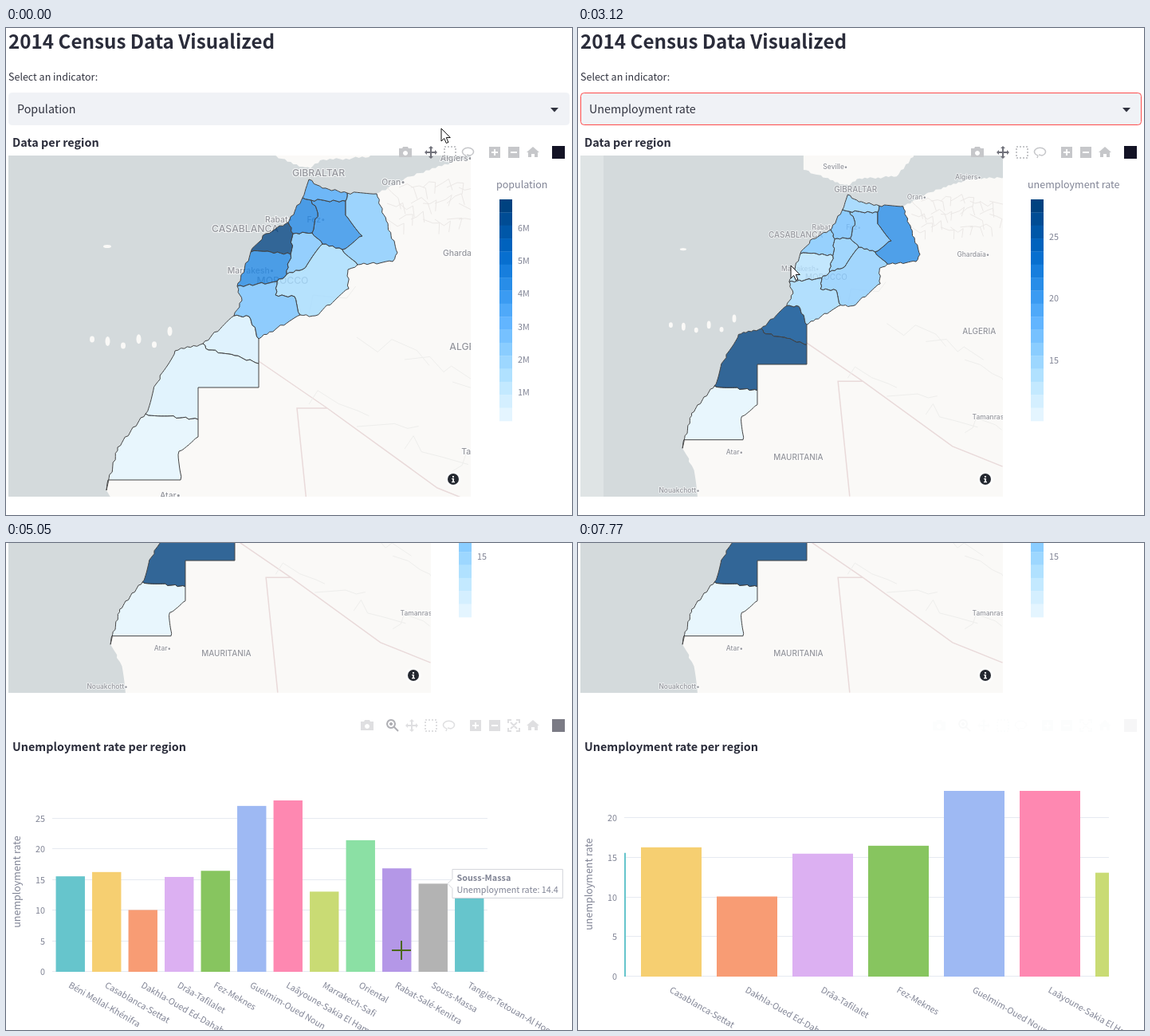
Recreate the animation shown at these times as an HTML page. Size 710 by 611 pixels, loop 8000 ms.

```html
<!DOCTYPE html>
<html lang="en">
<head>
<meta charset="utf-8">
<title>Census dashboard</title>
<style>
  html, body { margin: 0; width: 100%; height: 100%; overflow: hidden; background: #fff; }
  svg { display: block; width: 710px; height: 611px; }
  text { font-family: "Noto Sans CJK JP", "Noto Sans CJK SC", "Noto Sans", sans-serif; white-space: pre; }
  .place { font-family: Inter, "Open Sans", sans-serif; text-anchor: middle; paint-order: stroke; stroke: #fff; stroke-opacity: .7; stroke-width: 2px; }
  .region { stroke: #444; stroke-width: 1px; fill-opacity: .8; vector-effect: non-scaling-stroke; }
  #panel { filter: drop-shadow(0 4px 8px rgba(0, 0, 0, .3)); }
  #cross { mix-blend-mode: difference; }
  #click { mix-blend-mode: multiply; }
</style>
</head>
<body>
<svg id="stage" viewBox="0 0 710 611"></svg>
<script>
const LOOP = 8000;
const NS = 'http://www.w3.org/2000/svg';
const stage = document.getElementById('stage');

function set(node, attrs) {
  for (const key in attrs) node.setAttribute(key, attrs[key]);
  return node;
}
function add(parent, tag, attrs = {}, content) {
  const node = set(document.createElementNS(NS, tag), attrs);
  if (content !== undefined) node.textContent = content;
  parent.appendChild(node);
  return node;
}
const show = (node, on) => { node.style.display = on ? '' : 'none'; };
const fade = (node, opacity) => { show(node, opacity > 0); node.style.opacity = opacity; };
const ramp = (t, from, to) => Math.min(1, Math.max(0, (t - from) / (to - from)));
const smooth = k => k * k * (3 - 2 * k);
const mix = (a, b, k) => a + (b - a) * k;
const between = (t, from, to) => t >= from && t < to;
function noise(n) {
  const s = Math.sin(n) * 43758.5453;
  return s - Math.floor(s) - .5;
}

const INK = '#31333f', GREY = '#808495';
const SIZE = { big: 24.2, title: 14.4, body: 14.3, small: 12.5, tick: 10.8 };
function label(parent, x, y, content, size, fill = INK, extra = {}) {
  return add(parent, 'text', { x, y, 'font-size': size, fill, ...extra }, content);
}
const heading = (parent, x, y, content, size) => label(parent, x, y, content, size, '#2a2c3a', { 'font-weight': 700 });
function clip(id, x, y, width, height) {
  return add(add(stage, 'clipPath', { id }), 'rect', { x, y, width, height });
}

// Name, population in millions, unemployment rate, bar colour, border nodes
const REGIONS = [
  ['Béni Mellal-Khénifra', 2.52, 15.6, '#66c5cc', 'FELQJG'],
  ['Casablanca-Settat', 6.86, 16.3, '#f6cf71', 'nFGIlm'],
  ['Dakhla-Oued Ed-Dahab', .14, 10.1, '#f89c74', 'd45678ab'],
  ['Drâa-Tafilalet', 1.63, 15.5, '#dcb0f2', 'LMyRSUVWXKJQ'],
  ['Fez-Meknes', 4.24, 16.5, '#87c55f', 'ACONMLED'],
  ['Guelmim-Oued Noun', .43, 27.1, '#9eb9f3', 'iZY190h'],
  ['Laâyoune-Sakia El Hamra', .37, 28, '#fe88b1', 'h091234def'],
  ['Marrakech-Safi', 4.52, 13.1, '#c9db74', 'lIGJKk'],
  ['Oriental', 2.31, 21.5, '#8be0a4', 'stvwxyMNOC'],
  ['Rabat-Salé-Kenitra', 4.58, 16.9, '#b497e7', 'npADEF'],
  ['Souss-Massa', 2.68, 14.4, '#b3b3b3', 'kKXWVYZij'],
  ['Tangier-Tetouan-Al Hoceima', 3.56, 14.9, '#66c5cc', 'pqrsCA'],
].map(([name, population, rate, color, nodes]) => ({ name, population, rate, color, nodes }));

// Border nodes shared by neighbours: coast in lower case, inland in capitals, desert in digits
const COAST = 'abdefhijklmnpqrst';
const NODES = {};
const nodeList =
  'a126,580 b140,526 d175,484 e188,447 f212,405 h247,396 i286,361 j296,342 k290,324 l307,281 m326,258 n354,244 ' +
  'p372,213 q380,190 r397,201 s428,207 t465,208 v477,242 w491,282 x485,293 y441,297 ' +
  'A383,216 C426,217 D391,232 E384,257 F360,258 G357,284 I328,280 J352,309 K340,318 L397,271 M422,278 N447,261 O426,235 ' +
  'Q372,303 R429,303 S430,327 U388,361 V369,360 W362,337 X338,335 Y317,390 Z305,362';
const desert = '0:254,404 1:317,421 2:317,451 3:241,451 4:241,491 5:241,513 6:217,531 7:219,567 8:128,567 9:287,411';
const parse = pair => pair.split(',').map(Number);
for (const item of nodeList.split(' ')) NODES[item[0]] = parse(item.slice(1));
for (const item of desert.split(' ')) NODES[item[0]] = parse(item.slice(2));
const nodesOf = letters => [...letters].map(letter => NODES[letter]);

// Wobbly outline; each wobble depends on its edge only, so neighbours share it
function rough(points) {
  const out = [];
  points.forEach((a, i) => {
    const b = points[(i + 1) % points.length];
    out.push(a);
    if (a[0] === b[0] || a[1] === b[1]) return;
    const [p, q] = a[0] < b[0] ? [a, b] : [b, a];
    const dx = q[0] - p[0], dy = q[1] - p[1], length = Math.hypot(dx, dy);
    const n = Math.max(1, Math.round(length / 4));
    for (let j = 1; j < n; j++) {
      const k = p === a ? j : n - j;
      const off = noise(p[0] * 12.9 + p[1] * 78.2 + k * 37.7) * 3 / length;
      out.push([p[0] + dx * k / n - dy * off, p[1] + dy * k / n + dx * off]);
    }
  });
  return 'M' + out.map(p => p.map(v => v.toFixed(1)).join()).join('L') + 'Z';
}

const BLUES = ['e4f5ff', 'c7ebff', 'a6dcff', '83c9ff', '60b4ff', '3d9df3', '1c83e1', '0068c9', '0054a3', '004280'];
function blue(k) {
  const at = Math.min(8.999, Math.max(0, k * 9)), i = Math.floor(at);
  const channel = (hex, c) => parseInt(hex.slice(c * 2, c * 2 + 2), 16);
  return `rgb(${[0, 1, 2].map(c => Math.round(mix(channel(BLUES[i], c), channel(BLUES[i + 1], c), at - i)))})`;
}
const peopleShare = millions => (millions - .14) / 6.72;
const rateShare = rate => (rate - 10.1) / 17.9;

// Toolbar icons, centred on the origin
const ICONS = {
  camera: 'M-8,-5h4l1,-2h6l1,2h4v11h-16zM0,-2a3,3 0 1 0 .01,0z',
  pan: 'M0,-8l3,3h-2v4h4v-2l3,3l-3,3v-2h-4v4h2l-3,3l-3,-3h2v-4h-4v2l-3,-3l3,-3v2h4v-4h-2z',
  plus: 'M-7,-7h14v14h-14zM-1,-4v3h-3v2h3v3h2v-3h3v-2h-3v-3z',
  minus: 'M-7,-7h14v14h-14zM-4,-1v2h8v-2z',
  home: 'M0,-7l8,7h-2v6h-4v-4h-4v4h-4v-6h-2z',
  square: 'M-8,-8h16v16h-16z',
};
const LINE_ICONS = {
  box: 'M-7,-7h14v14h-14z',
  lasso: 'M-4,4a7,5 0 1 1 5,0l-4,-1M-4,4l-1,3',
  zoom: 'M-2,-7a5,5 0 1 0 .01,0M2,2l5,5M-4,-2h4M-2,-4v4',
  scale: 'M-7,-3v-4h4M3,-7h4v4M7,3v4h-4M-3,7h-4v-4M-4,-4l8,8M4,-4l-8,8',
};
// Icons run leftwards from the right edge; "|" widens the gap between groups
function toolbar(parent, y, active, names) {
  const bar = add(parent, 'g');
  let x = 693;
  for (const name of names.split(' ').reverse()) {
    if (name === '|') { x -= 8; continue; }
    const tone = name === 'square' ? '#131325' : name === active ? '#70717a' : '#c6c7ca';
    const line = LINE_ICONS[name];
    add(bar, 'path', {
      d: line || ICONS[name], transform: `translate(${x} ${y})`, 'fill-rule': 'evenodd',
      fill: line ? 'none' : tone, stroke: line ? tone : 'none',
      'stroke-width': name === 'lasso' ? 1.5 : 2, 'stroke-dasharray': name === 'box' ? '2 2' : 'none',
    });
    x -= 24;
  }
  return bar;
}

// Page top
add(stage, 'rect', { width: 710, height: 611, fill: '#fff' });
const page = add(stage, 'g');
heading(page, 3, 26, '2014 Census Data Visualized', SIZE.big);
label(page, 3, 66, 'Select an indicator:', SIZE.small);
const field = add(page, 'rect', { x: 3.5, y: 81.5, width: 703, height: 40, rx: 4, fill: '#f0f2f6' });
const choice = label(page, 14, 107, '', SIZE.body);
const caret = add(page, 'rect', { x: 150, y: 92, width: 1, height: 20, fill: INK });
add(page, 'path', { d: 'M683,100h10l-5,5.5z', fill: INK });
heading(page, 8, 149, 'Data per region', SIZE.title);

// Map
const MAP = { x: 3, y: 160, width: 580, height: 428 };
const LAND = '#faf9f7';
const mapFrame = clip('map-clip', MAP.x, MAP.y, MAP.width, MAP.height);
const mapBox = add(page, 'g', { 'clip-path': 'url(#map-clip)' });
add(mapBox, 'rect', { ...MAP, fill: '#d4dadc' });
const map = add(mapBox, 'g');
const africa = [...nodesOf(COAST), [500, 189], [566, 166], [720, 160], [720, 660], [150, 660], [142, 610]];
const spain = [[312, 120], [312, 152], [372, 174], [382, 176], [394, 166], [455, 162], [490, 120]];
for (const land of [africa, spain]) add(map, 'path', { fill: LAND, d: rough(land) });
for (let i = 0; i < 6; i++)
  add(map, 'ellipse', { cx: 108 + i * 19.5, cy: 394 + noise(i + 3) * 12 - (i > 4 ? 18 : 0), rx: 3, ry: 4 + i % 2 * 2, fill: LAND });
add(map, 'ellipse', { cx: 127, cy: 274, rx: 5, ry: 2, fill: LAND });

function thinLine(d, stroke, width) {
  add(map, 'path', { d, stroke, fill: 'none', 'stroke-width': width, 'vector-effect': 'non-scaling-stroke' });
}
thinLine('M317,418L403,477L541,577L618,608M403,477H365L383,654', '#e9dada', 1.5);
let roads = '', cells = '';
for (let i = 0; i < 8; i++) {
  roads += `M${380 + i % 4 * 60},${360 + i * 28}`;
  for (let j = 0; j < 4; j++) roads += `l${20 + noise(i * 9 + j) * 30},${noise(i * 5 + j) * 50}`;
}
for (let i = 0; i < 26; i++)
  cells += `M${478 + i % 9 * 15},${200 + Math.floor(i / 9) * 20}l${10 + noise(i) * 8},${noise(i + 50) * 18}l8,${noise(i + 90) * 14}l${noise(i + 7) * 12},14`;
thinLine(roads, '#eeeeec', 1);
thinLine(cells, '#ebe8e6', 1);

const PLACES = {
  GIBRALTAR: [392, 186], CASABLANCA: [300, 256], MOROCCO: [347, 321], ALGERIA: [582, 404], MAURITANIA: [304, 597.5],
  Oran: [486, 197], Algiers: [565, 167], Rabat: [342, 244], Fez: [389, 244], Marrakesh: [307, 308],
  Ghardaïa: [573, 286], Tamanrasset: [606, 535], Atar: [206, 590], Seville: [361, 151], Nouakchott: [121, 648],
};
for (const name in PLACES) {
  const country = name === name.toUpperCase();
  label(map, ...PLACES[name], country ? name : name + '•', country ? 12.2 : 10.4, '#94969c', { class: 'place', 'font-weight': 500 });
}
for (const region of REGIONS) region.shape = add(map, 'path', { class: 'region', d: rough(nodesOf(region.nodes)) });
const strip = add(mapBox, 'rect', { ...MAP, width: 29, fill: '#fff', opacity: .25 });
const mapCover = add(mapBox, 'rect', { ...MAP, fill: '#fff' });
const info = add(page, 'g');
add(info, 'circle', { r: 10, fill: '#fff', 'fill-opacity': .6 });
add(info, 'circle', { r: 7, fill: '#242830' });
add(info, 'path', { d: 'M-1,-4h2v2h-2zM-1.8,-1h2.8v4h1v1.2h-4v-1.2h1.2v-2.8h-1z', fill: '#fff' });

// Colour scales
const SCALE = { top: 215, height: 278, steps: 17 };
function colourScale(title, x, ticks, share, unit) {
  const scale = add(page, 'g');
  label(scale, x - 4, 201, title, SIZE.small, GREY);
  const band = SCALE.height / SCALE.steps;
  for (let i = 0; i < SCALE.steps; i++)
    add(scale, 'rect', { x, y: SCALE.top + band * i, width: 16, height: band + .3, fill: blue(1 - i / (SCALE.steps - 1)) });
  for (const tick of ticks)
    label(scale, x + 23, SCALE.top + SCALE.height * (1 - share(tick)) + 4, tick + unit, SIZE.tick, GREY);
  return scale;
}
const populationScale = colourScale('population', 619, [1, 2, 3, 4, 5, 6], peopleShare, 'M');
const rateScale = colourScale('unemployment rate', 568, [15, 20, 25], rateShare, '');
const mapTools = toolbar(page, 156, 'pan', 'camera | pan box lasso | plus minus home | square');

// Bar chart
const WIDE = { left: 58, right: 604, bottom: 538, first: 80.75, step: 45.5, unit: 7.68, titleY: 425 };
const ZOOMED = { left: 58, right: 666, bottom: 544, first: 22, step: 95, unit: 9.95, titleY: 428 };
const PLOT_TOP = 311;
const chart = add(stage, 'g');
heading(chart, 8, 261, 'Unemployment rate per region', SIZE.title);
const axisTitle = label(chart, 0, 0, 'unemployment rate', SIZE.small, GREY, { 'text-anchor': 'middle' });
const chartTools = toolbar(chart, 229, 'zoom', 'camera | zoom pan box lasso | plus minus scale home | square');
const grid = [0, 5, 10, 15, 20, 25].map(value => ({
  value,
  line: add(chart, 'path', { stroke: '#e6eaf1' }),
  text: label(chart, 49, 0, value, SIZE.tick, GREY, { 'text-anchor': 'end' }),
}));
const plotFrame = clip('plot-clip', WIDE.left, PLOT_TOP, 0, 0);
const bars = add(chart, 'g', { 'clip-path': 'url(#plot-clip)' });
for (const region of REGIONS) {
  region.bar = add(bars, 'rect', { fill: region.color });
  region.text = label(chart, 0, 0, region.name, SIZE.tick, GREY);
}
const shade = add(chart, 'path', { 'fill-opacity': .4, 'fill-rule': 'evenodd' });
const corners = add(chart, 'path', { fill: '#fff', stroke: '#444' });
const tip = add(chart, 'g');
const tipBox = add(tip, 'path', { fill: '#fff', stroke: '#d3d5da' });
const tipName = label(tip, 0, 0, '', SIZE.tick, GREY, { 'font-weight': 700 });
const tipValue = label(tip, 0, 0, '', SIZE.tick, GREY);

function drawChart({ left, right, bottom, first, step, unit, titleY }) {
  set(plotFrame, { width: right - left, height: bottom - PLOT_TOP });
  set(axisTitle, { transform: `translate(18 ${titleY}) rotate(-90)` });
  for (const { value, line, text } of grid) {
    const y = bottom - value * unit;
    show(line, y > PLOT_TOP);
    show(text, y > PLOT_TOP);
    set(line, { d: `M${left},${Math.round(y) - .5}H${right}` });
    set(text, { y: y + 4 });
  }
  REGIONS.forEach((region, i) => {
    const centre = first + step * i, height = region.rate * unit;
    set(region.bar, { x: centre - step * .4, y: bottom - height, width: step * .8, height });
    show(region.text, centre > left && centre < right);
    set(region.text, { transform: `translate(${centre - 3} ${bottom + 19}) rotate(30)` });
  });
}

function drawTip(x, y) {
  const i = Math.floor((x - WIDE.left) / WIDE.step), region = REGIONS[i];
  const on = Boolean(region) && y > PLOT_TOP && y < WIDE.bottom;
  show(tip, on);
  if (!on) return;
  tipName.textContent = region.name;
  tipValue.textContent = 'Unemployment rate: ' + region.rate;
  const width = Math.max(tipName.getComputedTextLength(), tipValue.getComputedTextLength()) + 11;
  const centre = WIDE.first + WIDE.step * i, half = WIDE.step * .4;
  const side = centre + half + 6 + width < 706 ? 1 : -1;
  const tipX = centre + side * half, tipY = WIDE.bottom - region.rate * WIDE.unit;
  const near = tipX + side * 6, textX = (side > 0 ? near : near - width) + 5.5;
  set(tipBox, { d: `M${tipX},${tipY}L${near},${tipY - 6}v-12h${side * width}v36h${-side * width}v-12Z` });
  set(tipName, { x: textX, y: tipY - 3 });
  set(tipValue, { x: textX, y: tipY + 12 });
}

const DRAG = { x: 98, y: 358 };
function drawSelection(x, y) {
  const { left, right, bottom } = WIDE;
  const r = Math.max(DRAG.x + 1, x), b = Math.min(bottom, Math.max(DRAG.y + 1, y));
  set(shade, { d: `M${left},${PLOT_TOP}H${right}V${bottom}H${left}ZM${DRAG.x},${DRAG.y}H${r}V${b}H${DRAG.x}Z` });
  const arm = Math.min(10, (r - DRAG.x) / 2, (b - DRAG.y) / 2);
  const corner = (cx, cy, sx, sy) =>
    `M${cx - sx * 3.5},${cy + sy * (arm - .5)}h${sx * 3}v${-sy * arm}h${sx * arm}v${-sy * 3}h${-sx * (arm + 3)}Z`;
  set(corners, { d: corner(DRAG.x, DRAG.y, 1, 1) + corner(r, DRAG.y, -1, 1) + corner(DRAG.x, b, 1, -1) + corner(r, b, -1, -1) });
}

// Dropdown
const ROW = 40, LIST_TOP = 122;
const panel = add(stage, 'g', { id: 'panel' });
clip('panel-clip', 3, LIST_TOP, 704, 300);
add(panel, 'rect', { x: 3, y: LIST_TOP, width: 704, height: 300, rx: 3, fill: '#fff' });
const list = add(panel, 'g', { 'clip-path': 'url(#panel-clip)' });
const hoverRow = add(list, 'rect', { x: 3, width: 698, height: ROW, fill: '#f0f2f6' });
['Population', 'Density', 'Multidimensional poverty index (in %)', 'Illiteracy rate', 'Unemployment rate', 'Fertility rate', 'Number of households', 'Proportion of singles']
  .forEach((option, i) => label(list, 19, LIST_TOP + 25 + i * ROW, option, SIZE.body));
add(list, 'rect', { x: 701, y: LIST_TOP, width: 6, height: 225, rx: 3, fill: '#a9a9ab' });

// Pointer
const click = add(stage, 'circle', { id: 'click', r: 12, fill: '#ffff66' });
const pointerStyle = { fill: '#fff', stroke: '#111', 'stroke-linejoin': 'round' };
const pointers = {
  arrow: add(stage, 'path', { ...pointerStyle, d: 'M0,0v16l3.7,-3.5l2.6,6l2.6,-1.1l-2.6,-5.9h5z' }),
  hand: add(stage, 'path', { ...pointerStyle, d: 'M-1.5,1.5a1.5,1.5 0 0 1 3,0v6l7,1.5q2,.6 2,3l-.5,5q-1,2 -1,5h-9l-6,-8q-1,-2 1,-2.5l3.5,2.5z' }),
  cross: add(stage, 'path', { id: 'cross', d: 'M-12,0h24M0,-12v24', stroke: '#fff', 'stroke-width': 2 }),
};
const SWITCH = 2080, PRESS = 5820, RELEASE = 7100, LAG = 70;
// Pointer moves: start, end, target x, target y; it rests in between
const MOVES = [
  [70, 210, 541, 102], [960, 1720, 267, 298], [3330, 4300, 580, 513], [4920, 5050, 497, 511],
  [5050, 5750, DRAG.x, DRAG.y], [PRESS, 6580, 304, 537], [6580, 6900, 390, 547], [7480, 7700, 86, 452],
];
function pointerAt(t) {
  return MOVES.reduce(([x, y], [from, to, toX, toY]) => {
    const k = ramp(t, from, to);
    return [mix(x, toX, k), mix(y, toY, k)];
  }, [546, 126]);
}

function drawMap(t, rateView) {
  const width = rateView ? 530 : MAP.width;
  set(mapFrame, { width });
  set(map, { transform: rateView ? 'translate(28.3 54) scale(.816)' : '' });
  for (const { shape, population, rate } of REGIONS)
    set(shape, { fill: blue(rateView ? rateShare(rate) : peopleShare(population)) });
  fade(mapCover, rateView ? 1 - ramp(t, 2740, 3090) : 0);
  show(strip, rateView && t < 4160);
  set(info, { transform: `translate(${width - 19} 566)` });
  show(populationScale, !rateView);
  show(rateScale, rateView);
}

function render(t) {
  const rateView = t >= SWITCH, zoomed = t >= RELEASE;
  const scroll = 400 * smooth(ramp(t, 4480, 4850));
  const [x, y] = pointerAt(t), [lagX, lagY] = pointerAt(t - LAG);
  set(page, { transform: `translate(0 ${-scroll})` });
  set(chart, { transform: `translate(0 ${400 - scroll})` });

  choice.textContent = rateView ? 'Unemployment rate' : 'Population';
  set(field, { stroke: t >= 350 ? '#ff4b4b' : '#f0f2f6' });
  show(caret, t >= 2370 && (t - 2370) % 1000 < 500);
  drawMap(t, rateView);
  fade(mapTools, rateView ? 1 : 1 - ramp(t, 50, 210));

  fade(panel, ramp(t, 380, 540) * (1 - ramp(t, 2030, SWITCH)));
  set(hoverRow, { y: LIST_TOP + ROW * Math.max(0, Math.floor((y - LIST_TOP) / ROW)) });

  drawChart(zoomed ? ZOOMED : WIDE);
  fade(chartTools, zoomed
    ? ramp(t, RELEASE, 7300) * (1 - ramp(t, 7480, 7780))
    : ramp(t, 4940, 5140) * (1 - ramp(t, PRESS, 6000)));
  const hovering = between(t, 4980, PRESS), dragging = between(t, PRESS + LAG, RELEASE);
  show(tip, hovering);
  if (hovering) drawTip(lagX, lagY);
  show(shade, dragging);
  show(corners, dragging);
  if (dragging) drawSelection(lagX, lagY);

  const kind = t >= 7700 ? '' : t >= 4870 ? 'cross' : between(t, 140, SWITCH) ? 'hand' : 'arrow';
  for (const name in pointers) {
    show(pointers[name], name === kind);
    set(pointers[name], { transform: `translate(${Math.round(x)} ${Math.round(y)})` });
  }
  show(click, between(t, 350, 560) || between(t, 1960, SWITCH) || between(t, PRESS, RELEASE));
  set(click, { cx: x, cy: y + 1 });
}

const start = performance.now();
function tick() {
  render((performance.now() - start) % LOOP);
  requestAnimationFrame(tick);
}
tick();
</script>
</body>
</html>
```
